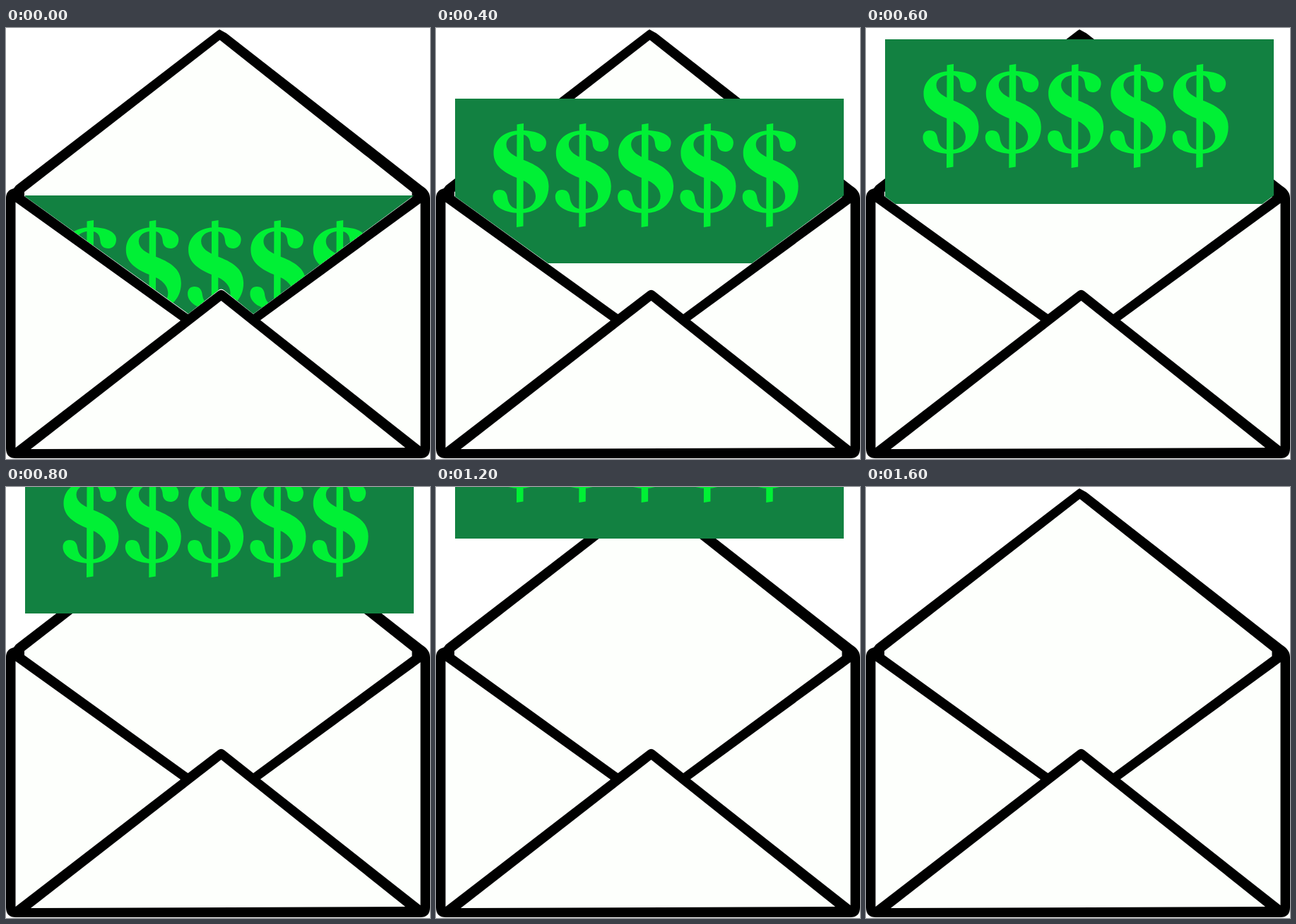
Animation, 600 px wide and 610 px high, one loop 1.9 s. Source, as an HTML page:

```html
<!DOCTYPE html>
<html lang="en">
<head>
<meta charset="utf-8">
<title>Money envelope</title>
<style>
  html, body { margin: 0; width: 100%; height: 100%; overflow: hidden; background: #fff; }
  svg { display: block; width: 600px; height: 610px; }
</style>
</head>
<body>
<svg viewBox="0 0 600 610" role="img" aria-label="$$$$$">
  <defs>
    <clipPath id="pocket">
      <path d="M0 -300H600V237H577L350 404.7L309 371.5Q304.5 367.5 300 371.5L258 404.500L27 238.500H0Z"/>
    </clipPath>
    <path id="dollar" d="M119 45C140 44.500 156 51 156 62C156 70 151 75 145 75C138 75 134 71 133.500 65
      C133 58 131 50.500 119 50.500C106 50.500 99.500 57 99.500 65
      C99.500 75 110 81 122 86C143 94 159.500 103 159.500 124C159.500 148 142 162 119 162
      C96 162 80.500 152 80.500 139C80.500 133 84 129 90 129C97 129 100 133 101 139
      C102 149 107 156.500 119 156.500C133 156.500 141 149 141 138
      C141 126 130 118 117 113C96 105 81.500 95 81.500 77C81.500 58 97 45.500 119 45Z
      M114.500 36.500L124 35L123.500 180.500L114 182Z"/>
  </defs>

  <path d="M302 2L312 7.500L588 223C597 229 600 234 600 241V595Q600 609 586 609H14Q0 609 0 595V241C0 234 3 229 11 227L14 223L299 4Z"/>
  <g fill="#fdfffc">
    <path d="M302.500 17L574.500 232.500V239.500L350 405L309 372.500Q304.500 369 300 372.500L257.500 405L26 238V232Z"/>
    <path d="M13.500 246.500L247 414L13.500 594Z"/>
    <path d="M586.500 248L360 413.500L586.500 592Z"/>
    <path d="M304.500 386L565 594L35 596Z"/>
  </g>

  <g clip-path="url(#pocket)">
    <g id="bill">
      <rect x="27" width="550" height="233" fill="#128141"/>
      <g id="signs" fill="#00f035"></g>
    </g>
  </g>
</svg>
<script>
  const LOOP = 1900, STEP = 100;
  const bill = document.getElementById('bill');
  const signs = document.getElementById('signs');

  for (let i = 0; i < 5; i++) {
    const sign = document.createElementNS('http://www.w3.org/2000/svg', 'use');
    sign.setAttribute('href', '#dollar');
    sign.setAttribute('x', i * 88.3);
    signs.append(sign);
  }

  // [time, top edge of the bill]
  const keys = [[0, 237], [200, 182], [400, 100], [600, 16], [800, -54], [1200, -160], [1600, -233], [LOOP, -233]];

  function topAt(t) {
    const i = keys.findIndex(k => k[0] > t);
    const [t0, y0] = keys[i - 1], [t1, y1] = keys[i];
    return Math.round(y0 + (y1 - y0) * (t - t0) / (t1 - t0));
  }

  function draw(ms) {
    const t = Math.floor((ms % LOOP) / STEP) * STEP;
    bill.setAttribute('transform', `translate(0 ${topAt(t)})`);
    bill.setAttribute('visibility', t < 1600 ? 'visible' : 'hidden');
  }

  const start = performance.now();
  function tick() {
    draw(performance.now() - start);
    requestAnimationFrame(tick);
  }
  tick();
</script>
</body>
</html>
```
